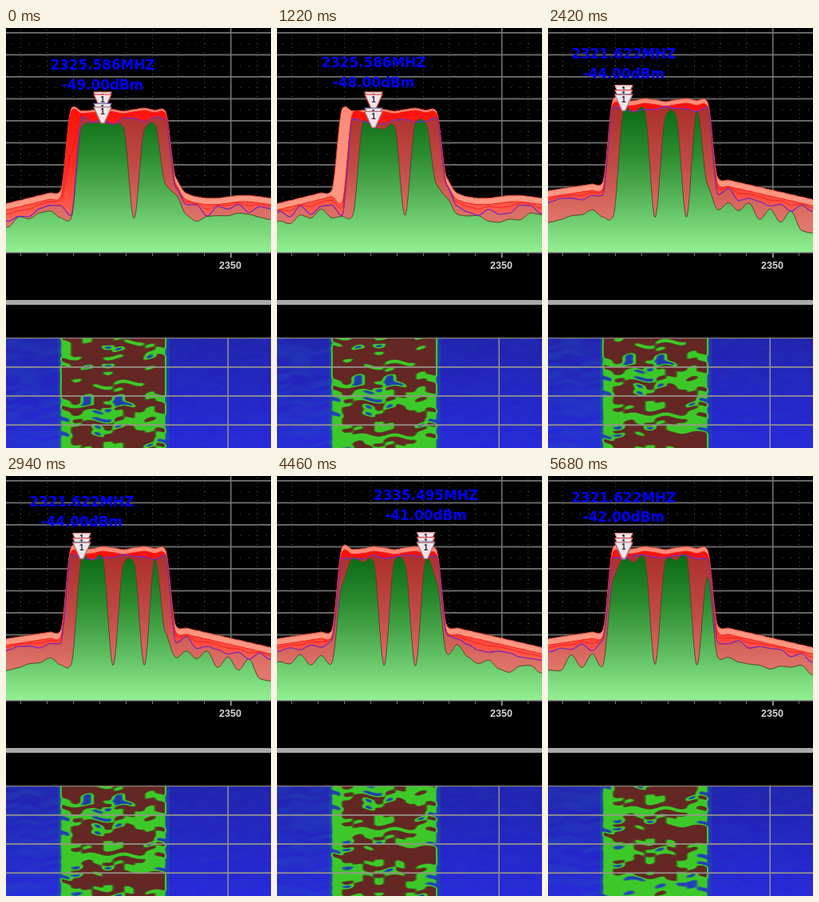
Recreate the animation shown at these times as an HTML page with a canvas. Size 332 by 525 pixels, loop 5.78 s.

```html
<!DOCTYPE html>
<html lang="en">
<head>
<meta charset="utf-8">
<title>Spectrum and waterfall</title>
<style>
html, body { margin: 0; width: 100%; height: 100%; overflow: hidden; background: #000; }
canvas { display: block; }
</style>
</head>
<body>
<canvas id="view" width="332" height="525"></canvas>
<script>
const W = 332, H = 525, LOOP = 5780, BASE = 280, FALL = 388;
const BINS = 27, FIRST = 7, LAST = 16, STEP = 13.1;
const ctx = document.getElementById('view').getContext('2d');
const binX = j => -10 + STEP * j;
const lerp = (a, b, k) => a + (b - a) * k;
const smooth = k => k * k * (3 - 2 * k);

// Repeatable random value in 0..1
function hash(a, b = 0) {
  const s = Math.sin(a * 127.1 + b * 311.7 + 4.3) * 43758.5453;
  return s - Math.floor(s);
}

// Marked bin and level, first raised bin of each trace, last live bin, notches
const POSES = [
  { slot: 0, bin: 10, dbm: -49, peak: 7, mean: 8, live: 8, end: 15, gaps: [13] },
  { slot: 4, bin: 10, dbm: -48, peak: 8, mean: 8, live: 9, end: 15, gaps: [13] },
  { slot: 6, bin: 13, dbm: -47.5, peak: 8, mean: 9, live: 9, end: 14, gaps: [12, 13] },
  { slot: 9, bin: 8, dbm: -44, peak: 7, mean: 7, live: 8, end: 15, gaps: [11, 14] },
  { slot: 12, bin: 15, dbm: -43, peak: 7, mean: 7, live: 7, end: 16, gaps: [11, 14] },
  { slot: 14, bin: 15, dbm: -41, peak: 7, mean: 7, live: 7, end: 16, gaps: [11, 14] },
  { slot: 18, bin: 8, dbm: -42, peak: 7, mean: 7, live: 7, end: 16, gaps: [11, 15] }
];
const isLate = slot => slot > 7;
const inBand = j => j >= FIRST && j <= LAST;

function holdAt(j, late) {
  if (inBand(j)) return (late ? 90 : 102) + 2 * Math.sin(j * 1.7);
  if (j < FIRST) return late ? 205 - 2 * j : 222 - 3.2 * j;
  const k = j - LAST - 1;
  return late ? 187 + 3 * k : 211 + 2 * Math.sin(j) - 22 * Math.exp(-2 * k);
}

function peakAt(j, pose, late) {
  if (!inBand(j)) return holdAt(j, late) + 8;
  return j < pose.peak ? 218 : holdAt(j, late) + (late ? 6 : 3);
}

function meanAt(j, pose, late) {
  const r = hash(pose.slot + 70, j);
  if (!inBand(j)) return holdAt(j, late) + 10 + 14 * r;
  if (j < pose.mean) return 234;
  return (late ? 98 : 111) + (late ? 7 : 12) * r;
}

function liveAt(j, pose, late) {
  const r = hash(pose.slot + 30, j);
  if (j < FIRST - 1 || j > LAST) return holdAt(j, late) + 20 + (late ? 24 : 12) * r;
  if (j < pose.live || pose.gaps.includes(j)) return 236 + 4 * (r - .5);
  if (j > pose.end) return 195;
  const shoulder = j === FIRST ? 26 : j === LAST ? 22 : 0;
  return (late ? 100 : 118) + 10 * r + shoulder;
}

// Between two poses every bin switches over at its own moment
function traces(slot) {
  const next = POSES.findIndex(p => p.slot >= slot);
  const b = POSES[next], a = POSES[Math.max(0, next - 1)];
  const part = a === b ? 1 : (slot - a.slot) / (b.slot - a.slot);
  const late = isLate(slot);
  const pick = cut => {
    if (isLate(a.slot) !== isLate(b.slot)) return late ? b : a;
    return cut < part ? b : a;
  };
  const build = at => Array.from({ length: BINS }, (_, j) =>
    at(j, pick(hash(slot, j) * .98), late));
  const near = pick(.5);
  return {
    near,
    hold: build(j => holdAt(j, late)),
    peak: build(j => peakAt(j, near, late)),
    mean: build(meanAt),
    live: build(liveAt)
  };
}

function curve(ys, bend) {
  const p = new Path2D();
  const at = j => ys[Math.max(0, Math.min(BINS - 1, j))];
  p.moveTo(binX(0), ys[0]);
  for (let j = 0; j < BINS - 1; j++) {
    p.bezierCurveTo(binX(j) + 4.4, at(j) + (at(j + 1) - at(j - 1)) * bend,
      binX(j + 1) - 4.4, at(j + 1) - (at(j + 2) - at(j)) * bend,
      binX(j + 1), at(j + 1));
  }
  p.lineTo(W + 12, ys[BINS - 1]);
  return p;
}

function gradient(y0, y1, ...colors) {
  const g = ctx.createLinearGradient(0, y0, 0, y1);
  colors.forEach((c, i) => g.addColorStop(i / (colors.length - 1), c));
  return g;
}

function stroke(path, color, width = 1) {
  ctx.strokeStyle = color;
  ctx.lineWidth = width;
  ctx.stroke(path);
}

function area(ys, fill, line, bend = .07) {
  const edge = curve(ys, bend), body = new Path2D(edge);
  body.lineTo(W + 12, BASE);
  body.lineTo(binX(0), BASE);
  ctx.fillStyle = fill;
  ctx.fill(body);
  stroke(edge, line);
}

function rect(color, x, y, w, h) {
  ctx.fillStyle = color;
  ctx.fillRect(x, y, w, h);
}

function text(str, x, y, font, color) {
  ctx.font = font;
  ctx.fillStyle = color;
  ctx.fillText(str, x, y);
}

function chartGrid() {
  for (let y = 19; y < BASE; y += 27.5)
    for (let x = 7; x < W; x += 11) rect('#4c4c4c', x, Math.round(y), 1, 1);
  for (let x = 18; x < W; x += 32.9)
    for (let y = 2; y < BASE; y += 5.5) rect('#484848', Math.round(x), Math.round(y), 1, 1);
  for (let y = 5; y < BASE; y += 27.5) rect('#666', 0, y, W, 2);
  rect('#777', 281, 0, 1.5, 287);
}

function marker(x, tip, line) {
  const p = new Path2D();
  p.moveTo(x - 11, tip - 20);
  p.lineTo(x + 11, tip - 20);
  p.lineTo(x + 2, tip);
  p.lineTo(x - 2, tip);
  p.closePath();
  ctx.fillStyle = '#f0e6ea';
  ctx.fill(p);
  stroke(p, line, 1.2);
  text('1', x, tip - 10.5, 'bold 10px "Liberation Sans", Arial, sans-serif', '#26263c');
}

function drawChart(slot) {
  const { near, hold, peak, mean, live } = traces(slot);
  rect('#000', 0, 0, W, FALL);
  chartGrid();
  area(hold, gradient(88, 240, '#ff8a76', '#ff9a84'), '#d8402e');
  area(peak, gradient(95, 245, '#ff1008', '#fb2a20', '#ff6a5a'), '#f02018');
  area(mean, gradient(100, 245, '#ad302d', '#c24a45', '#e2776c'), '#d8322c', .03);
  area(live, gradient(98, BASE, '#0a6a12', '#2c8c30', '#5cbb5e', '#92f092'), '#51492a');
  stroke(curve(mean.map((v, j) => lerp(peak[j], v, .4)), .04), 'rgba(230,20,20,.75)');
  stroke(curve(mean, .02), '#6a2cd0', 1.1);
  rect('#8c8c8c', 0, 280, W, 1.5);
  for (let x = 18; x < W; x += 32.9) rect('#777', Math.round(x), 281, 1, 4);
  rect('#999', 281, 281, 1.5, 6);

  const x = binX(near.bin);
  marker(x, hold[near.bin], '#e08c80');
  marker(x, peak[near.bin], '#d84a4a');
  marker(x, mean[near.bin], '#7468a4');
  marker(x, live[near.bin], '#b0787a');
  const font = 'bold 16.8px "DejaVu Sans", Verdana, sans-serif';
  const y = 46 + 2.75 * (-49 - near.dbm);
  text((2325.586 + (near.bin - 10) * 1.9818).toFixed(3) + 'MHZ', x, y + 6, font, '#0000fa');
  text(near.dbm.toFixed(2) + 'dBm', x, y + 30.5, font, '#0000fa');
  text('2350', 281, 301, 'bold 12.5px "Liberation Sans", Arial, sans-serif', '#d8d8d8');
  rect('#a9a9a9', 0, 340, W, 6);
}

// Share of weak cells at a given depth of the waterfall
function weakness(y) {
  if (y < 92) return .16;
  if (y > 232) return .97;
  return .43 + .3 * Math.cos((y - 100) * Math.PI / 25);
}

const ROW = 4.6, COLS = 10;
// Signal strength of one cell: 1 strong, .5 weak, 0 none
function cell(k, r) {
  const y = r * ROW;
  if (k < 0) return .17 * hash(r, Math.floor(k / 2));
  if (k >= COLS) return .08 * hash(r, k);
  if ((k === 2 || k === 5) && y > 70 && y < 85) return 0;
  const side = k === 0 && (y < 35 || y > 75) ? .65 : k > 7 ? .15 : 0;
  if (hash(r, k) > weakness(y) + side) return 1;
  return hash(r, k + 60) < .14 ? .1 : .5;
}

// Strength, then red, green, blue and opacity
const RAMP = [
  [0, 36, 70, 200, 0], [.2, 34, 90, 180, 120], [.38, 60, 195, 45, 255],
  [.62, 62, 205, 38, 255], [.74, 72, 92, 32, 255], [.84, 100, 39, 36, 255],
  [1, 100, 39, 36, 255]
];
function shade(s) {
  const i = Math.max(1, RAMP.findIndex(p => p[0] >= s));
  const a = RAMP[i - 1], b = RAMP[i];
  const k = (s - a[0]) / (b[0] - a[0]);
  return a.slice(1).map((v, c) => lerp(v, b[c + 1], k));
}

function makeStrip() {
  const strip = document.createElement('canvas');
  strip.width = W;
  strip.height = 268;
  const c = strip.getContext('2d');
  const img = c.createImageData(W, strip.height);
  for (let y = 0; y < strip.height; y++) {
    for (let x = 0; x < W; x++) {
      const u = (x - 75) / STEP, k = Math.floor(u);
      const v = (y - 2 * Math.sin(u * 2)) / ROW, r = Math.floor(v);
      const edge = k === -1 || k === COLS - 1;
      const fx = edge ? smooth(Math.max(0, Math.min(1, (u - k - .5) * 2 + .5))) : smooth(u - k);
      const fy = smooth(v - r);
      const s = lerp(lerp(cell(k, r), cell(k + 1, r), fx),
        lerp(cell(k, r + 1), cell(k + 1, r + 1), fx), fy);
      img.data.set(shade(s), (y * W + x) * 4);
    }
  }
  c.putImageData(img, 0, 0);
  return strip;
}
const strip = makeStrip();

function drawFall(step) {
  ctx.save();
  ctx.beginPath();
  ctx.rect(0, FALL, W, H - FALL);
  ctx.clip();
  rect(gradient(FALL, H, '#2222ac', '#2424c4', '#2828dc'), 0, FALL, W, H - FALL);
  rect('rgba(32,80,150,.5)', 65, FALL, 140, H - FALL);
  ctx.drawImage(strip, 0, FALL - Math.round(step * 2.12));
  ctx.restore();
  rect('#8f8878', 0, 387, W, 1.2);
  for (let y = 423; y < H; y += 36.2) rect('#9a968c', 0, y, W, 1.7);
  rect('#8e8c90', 277.4, FALL, 1.6, H - FALL);
}

let last = -1;
function frame(now) {
  const t = now % LOOP;
  // Four short ticks of 20 ms shift the 100 ms beat
  const shift = [520, 2620, 3840, 4660].filter(s => t >= s).length * 20;
  const step = Math.floor((t - shift) / 100);
  if (step !== last) {
    last = step;
    drawChart(Math.min(18, Math.floor(t / 300)));
    drawFall(step);
  }
  requestAnimationFrame(frame);
}
ctx.textAlign = 'center';
ctx.lineJoin = 'round';
frame(0);
</script>
</body>
</html>
```
